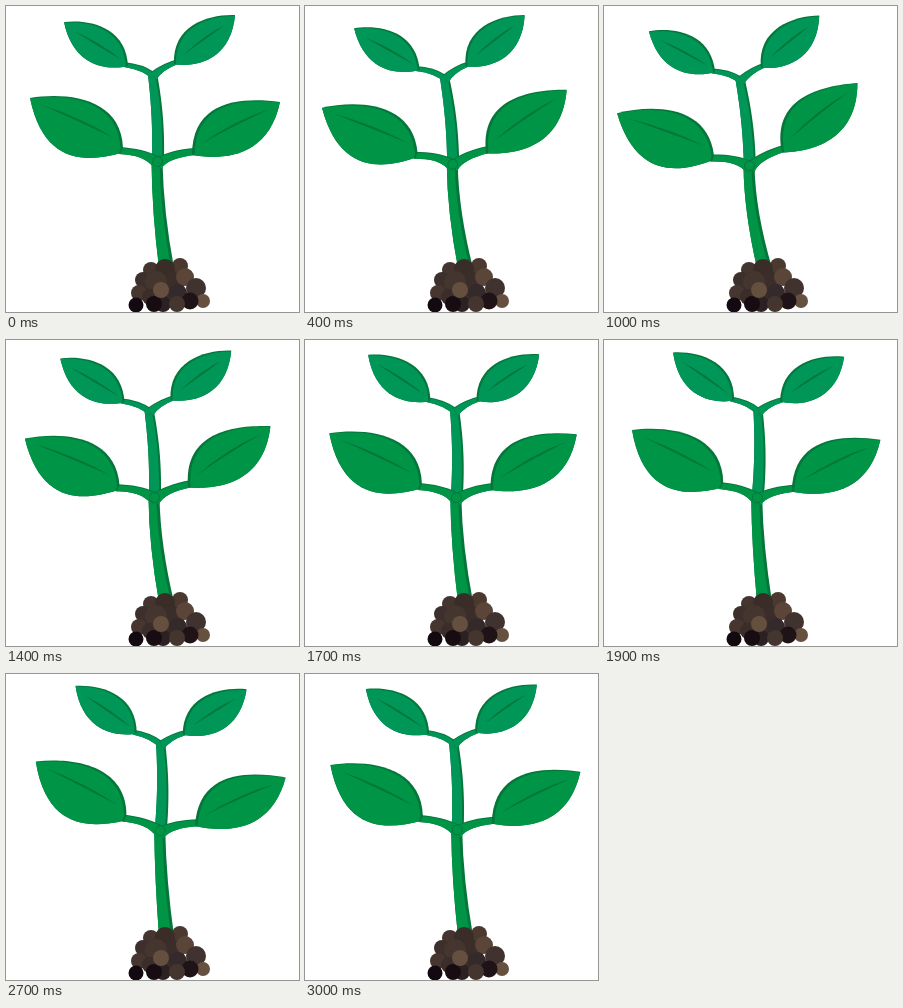
Recreate the animation shown at these times as an HTML page with a canvas. Size 293 by 306 pixels, loop 3.1 s.

```html
<!DOCTYPE html>
<html lang="en">
<head>
<meta charset="utf-8">
<title>Swaying seedling</title>
<style>
  html, body { margin: 0; width: 100%; height: 100%; overflow: hidden; background: #fff; }
  canvas { display: block; width: 293px; height: 306px; }
</style>
</head>
<body>
<canvas id="stage" width="293" height="306"></canvas>
<script>
const ctx = document.getElementById('stage').getContext('2d');
const GREEN = '#009446', TEAL = '#009657', DARK = '#04763a';
const LOOP = 3100, STEP = 100;

// Joint position, then rotation in degrees of crown, left leaf and right leaf.
const rest = { x: 151, y: 156, crown: 0, left: 0, right: 0 };
const poses = [
  { at: 0, ...rest },
  { at: 800, x: 143.5, y: 161.5, crown: -4.3, left: -6.2, right: -14.5 },
  { at: 1400, x: 148, y: 158, crown: -0.3, left: -2, right: -5.7 },
  { at: 2300, x: 156.5, y: 158.5, crown: 7, left: 5.2, right: 5.8 },
  { at: LOOP, ...rest }
];

const part = (d, dx, dy) => ({ path: new Path2D(d), dx, dy });
// A thin sliver, widest in the middle.
const vein = (x0, y0, cx, cy, x1, y1) =>
  new Path2D(`M${x0} ${y0}Q${cx} ${cy - 2.5} ${x1} ${y1}Q${cx} ${cy + 2.5} ${x0} ${y0}Z`);

const crown = {
  color: TEAL,
  shapes: [
    part('M142 69C145 95 147 120 146 157L158 157C159 120 156 95 151 67Z', -2, 0),
    part('M118 56Q137 58 148 66L147 74Q138 64 118 61Z', 0, 1),
    part('M172 53Q157 57 145 66L150 74Q156 64 172 58Z', 0, 1),
    part('M58 16C82 13 120 20 122 60C105 64 68 64 58 16Z', -2, 1),
    part('M229 9C203 8 166 19 168 58C190 62 225 54 229 9Z', 2, 1)
  ],
  veins: [vein(68, 25, 94, 39, 116, 54), vein(219, 19, 199, 31, 177, 49)]
};
const left = {
  color: GREEN,
  shapes: [
    part('M113 141C130 142 142 145 152 150L149 163C141 152 130 149 113 148Z', 0, 1),
    part('M24 92C62 86 115 92 117 142L115 147C82 156 38 160 24 92Z', -2.5, 1)
  ],
  veins: [vein(34, 98, 77, 115, 108, 132)]
};
const right = {
  color: GREEN,
  shapes: [
    part('M189 142C172 143 160 147 149 152L155 163C160 155 172 151 189 149Z', 0, 1),
    part('M274 96C236 91 186 94 186 149C215 154 262 153 274 96Z', 2.5, 1)
  ],
  veins: [vein(264, 103, 230, 116, 195, 138)]
};

const soil = [
  [157, 281, 21, '#3b2d29'], [174, 260, 8, '#4b382f'], [145, 264, 8, '#443530'],
  [137, 274, 8, '#3c2f2c'], [159, 263, 10, '#3a2c27'], [165, 278, 12, '#3b2d29'],
  [150, 276, 11, '#44352f'], [179, 271, 9, '#5a4538'], [133, 287, 8, '#46362f'],
  [144, 291, 8, '#3a2d2a'], [190, 282, 10, '#40332f'], [172, 287, 9, '#352a2b'],
  [197, 295, 7, '#665040'], [130, 299, 7.5, '#130910'], [157, 298, 8, '#2b2022'],
  [148, 298, 8, '#170c12'], [184, 295, 8.5, '#1f1318'], [171, 298, 8, '#44362f'],
  [155, 284, 8, '#65503f']
];

function poseAt(t) {
  const i = poses.findIndex(p => t < p.at);
  const a = poses[i - 1], b = poses[i];
  const k = (t - a.at) / (b.at - a.at);
  const pose = {};
  for (const key in rest) pose[key] = a[key] + (b[key] - a[key]) * k;
  return pose;
}

// Fills a shape and leaves a dark rim on the side it is shifted away from.
function shade({ path, dx, dy }, color) {
  ctx.fillStyle = DARK;
  ctx.fill(path);
  ctx.save();
  ctx.clip(path);
  ctx.translate(dx, dy);
  ctx.fillStyle = color;
  ctx.fill(path);
  ctx.restore();
}

function limb({ shapes, veins, color }, pose, angle) {
  ctx.save();
  ctx.translate(pose.x, pose.y);
  ctx.rotate(angle * Math.PI / 180);
  ctx.translate(-rest.x, -rest.y);
  shapes.forEach(s => shade(s, color));
  ctx.fillStyle = DARK;
  veins.forEach(v => ctx.fill(v));
  ctx.restore();
}

function stem({ x, y }) {
  const d = `M${x - 5.5} ${y}Q${x - 5} 206 153 262L168 262Q${x + 6.5} 206 ${x + 5.5} ${y}Z`;
  shade(part(d, -3, 0), GREEN);
}

function knot({ x, y }) {
  ctx.beginPath();
  ctx.arc(x + 0.5, y - 0.5, 5, 0, Math.PI * 2);
  ctx.fillStyle = GREEN;
  ctx.fill();
  ctx.strokeStyle = DARK;
  ctx.lineWidth = 1;
  ctx.stroke();
}

function ball([x, y, r, color]) {
  ctx.beginPath();
  ctx.arc(x, y, r, 0, Math.PI * 2);
  ctx.fillStyle = color;
  ctx.fill();
}

function draw(t) {
  const pose = poseAt(t);
  ctx.fillStyle = '#fff';
  ctx.fillRect(0, 0, 293, 306);
  stem(pose);
  limb(crown, pose, pose.crown);
  limb(left, pose, pose.left);
  limb(right, pose, pose.right);
  knot(pose);
  soil.forEach(ball);
}

let start;
function tick(now) {
  start ??= now;
  const t = Math.max(0, now - start) % LOOP;
  draw(Math.floor(t / STEP) * STEP);
  requestAnimationFrame(tick);
}
draw(0);
requestAnimationFrame(tick);
</script>
</body>
</html>
```
